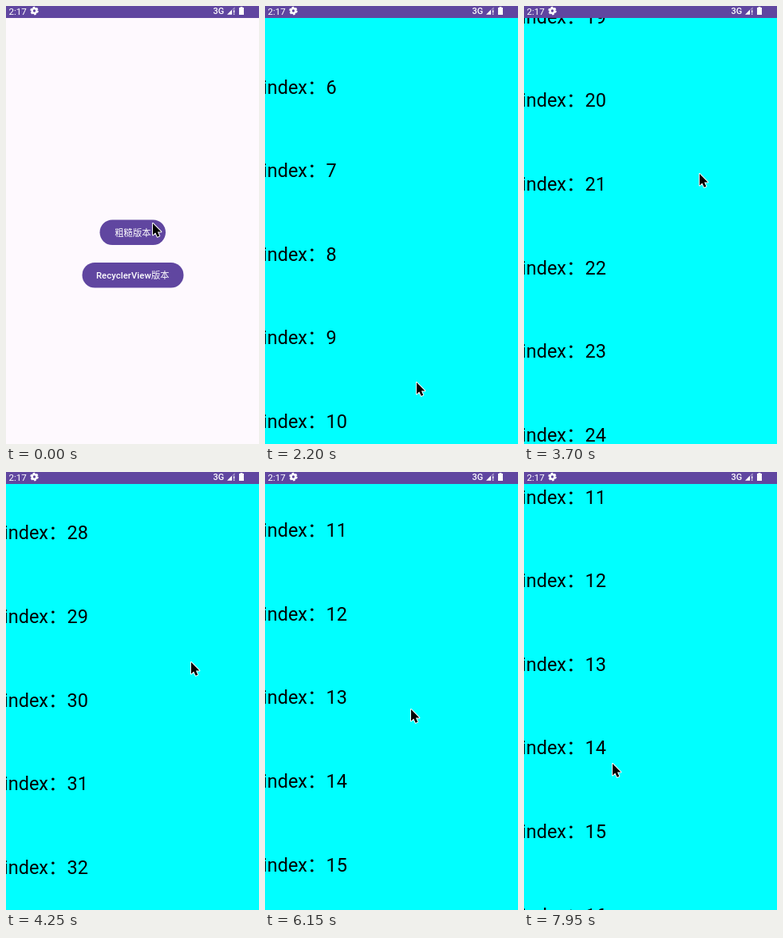
An HTML page for the animation above (8000 ms loop, 317 by 548 pixels).

```html
<!DOCTYPE html>
<html lang="zh-CN">
<head>
<meta charset="utf-8">
<title>index</title>
<style>
  html, body { margin: 0; width: 100%; height: 100%; overflow: hidden; background: #fef9fe; }
  svg { display: block; width: 317px; height: 548px; }
  text { font-family: Roboto, "Noto Sans CJK SC", "Noto Sans CJK", sans-serif; white-space: pre; }
  .btn { fill: #6046a0; }
  .label { fill: #fff; font-size: 11.3px; text-anchor: middle; letter-spacing: .08px; }
  .bold { font-weight: 500; }
  .row { font-size: 23.48px; fill: #000; }
</style>
</head>
<body>
<svg viewBox="0 0 317 548" xmlns="http://www.w3.org/2000/svg">
  <defs>
    <clipPath id="pill"><rect x="117.5" y="267.5" width="82.5" height="31.5" rx="15.75"/></clipPath>
  </defs>

  <rect width="317" height="548" fill="#fef9fe"/>
  <rect class="btn" x="117.5" y="267.5" width="82.5" height="31.5" rx="15.75"/>
  <circle id="ripple" cx="184" cy="273" r="0" fill="#fff" opacity="0" clip-path="url(#pill)"/>
  <text class="label" x="159" y="287.6">粗糙版本</text>
  <rect class="btn" x="95.5" y="321" width="127" height="31.5" rx="15.75"/>
  <text class="label" x="158.8" y="341.4"><tspan class="bold">RecyclerView</tspan>版本</text>

  <g id="page" opacity="0">
    <rect width="317" height="548" fill="#0ff"/>
    <g id="rows"></g>
  </g>

  <g id="status">
    <rect width="317" height="15" fill="#6046a0"/>
    <g fill="#fff">
      <text x="3.5" y="10.6" font-size="11.6">2:17</text>
      <circle cx="35.5" cy="6" r="2.9" fill="none" stroke="#fff" stroke-width="2.5"/>
      <circle cx="35.5" cy="6" r="4.4" fill="none" stroke="#fff" stroke-width="1.7" stroke-dasharray="2.5 2.108"/>
      <text class="bold" x="259.5" y="10.2" font-size="11">3G</text>
      <path d="M277 10.8 L283.2 4.6 V10.8Z"/>
      <path d="M283.2 4.6 L286.6 1.2 V4.6Z" opacity=".45"/>
      <path d="M285 5.2 h1.4 v3.2 h-1.4z M285 9.4 h1.4 v1.4 h-1.4z"/>
      <path d="M293.6 1 h2.8 v1.1 h1.6 v8.9 h-6 v-8.9 h1.6z"/>
    </g>
  </g>

  <path id="cursor" d="M0 0 V14.6 L3.3 11.5 L5.7 16.8 L8.3 15.7 L5.9 10.5 H10.4Z"
        fill="#000" stroke="#fff" stroke-width="1.9" stroke-linejoin="round" paint-order="stroke"/>
</svg>

<script>
const LOOP = 8000, TICK = 50, PITCH = 104.6;
const $ = id => document.getElementById(id);

// [time, centre of row 0]
const scroll = [
  [0, 67], [1300, 67], [1500, -130], [1750, -400], [2000, -500], [2200, -526.6],
  [2300, -535], [2500, -740], [2750, -865], [3000, -907], [3100, -920],
  [3300, -1160], [3600, -1750], [3900, -2400], [4250, -2853], [4550, -2990],
  [4900, -2960], [5200, -2750.7], [5400, -2340], [5650, -1720], [5900, -1270],
  [6150, -1078], [6700, -1078], [7150, -1270], [7300, -1270], [7700, -1140], [7950, -1119.6]
];

// [time, x, y] of the pointer tip
const pointer = [
  [0, 184, 272], [450, 184, 273], [1000, 190, 478], [1250, 190, 478],
  [1500, 196, 270], [1700, 198, 240], [2100, 190, 468], [2200, 190, 471],
  [2500, 198, 265], [2650, 198, 255], [3000, 190, 469], [3100, 191, 469],
  [3300, 205, 240], [3500, 208, 440], [3700, 220, 210], [3900, 224, 400],
  [4250, 232, 238], [4800, 246, 130], [5200, 246, 141], [5400, 230, 350],
  [5600, 214, 160], [5900, 190, 330], [6150, 183, 297], [6700, 183, 297],
  [7100, 150, 190], [7350, 130, 235], [7700, 113, 352], [7950, 111, 365]
];

// Monotone cubic interpolation through the keys
function track(keys, col) {
  const last = keys.length - 1;
  const slope = i => (keys[i + 1][col] - keys[i][col]) / (keys[i + 1][0] - keys[i][0]);
  const tangent = i => {
    if (i === 0 || i === last) return 0;
    const a = slope(i - 1), b = slope(i);
    return a * b <= 0 ? 0 : 2 * a * b / (a + b);
  };
  return t => {
    if (t >= keys[last][0]) return keys[last][col];
    let i = 0;
    while (t >= keys[i + 1][0]) i++;
    const h = keys[i + 1][0] - keys[i][0], u = (t - keys[i][0]) / h, v = 1 - u;
    return keys[i][col] * v * v * (1 + 2 * u) + keys[i + 1][col] * u * u * (3 - 2 * u)
      + h * u * v * (v * tangent(i) - u * tangent(i + 1));
  };
}

const scrollY = track(scroll, 1);
const tipX = track(pointer, 1), tipY = track(pointer, 2);
const ramp = (t, from, to) => Math.min(1, Math.max(0, (t - from) / (to - from)));
const easeOut = u => 1 - (1 - u) ** 3;

const rows = Array.from({ length: 7 }, () => {
  const el = document.createElementNS("http://www.w3.org/2000/svg", "text");
  el.setAttribute("class", "row");
  el.setAttribute("x", -3);
  return $("rows").appendChild(el);
});

function drawRows(top) {
  const first = Math.max(0, Math.floor(-top / PITCH));
  rows.forEach((el, k) => {
    const label = "index：" + (first + k);
    if (el.textContent !== label) el.textContent = label;
    el.setAttribute("y", (top + (first + k) * PITCH + 8.5).toFixed(2));
  });
}

function draw(t) {
  $("ripple").setAttribute("r", 75 * easeOut(ramp(t, 0, 300)));
  $("ripple").setAttribute("opacity", 0.2 * ramp(t, 0, 100) * (1 - ramp(t, 300, 500)));

  const open = easeOut(ramp(t, 250, 600)), size = 0.88 + 0.12 * open;
  $("page").setAttribute("opacity", ramp(t, 250, 400));
  $("page").setAttribute("transform", `translate(158.5 274) scale(${size}) translate(-158.5 -274)`);

  drawRows(scrollY(t));
  $("cursor").setAttribute("transform", `translate(${tipX(t).toFixed(1)} ${tipY(t).toFixed(1)})`);
}

const start = performance.now();
function loop() {
  const t = (performance.now() - start) % LOOP;
  draw(Math.floor(t / TICK) * TICK);
  requestAnimationFrame(loop);
}
draw(0);
requestAnimationFrame(loop);
</script>
</body>
</html>
```
